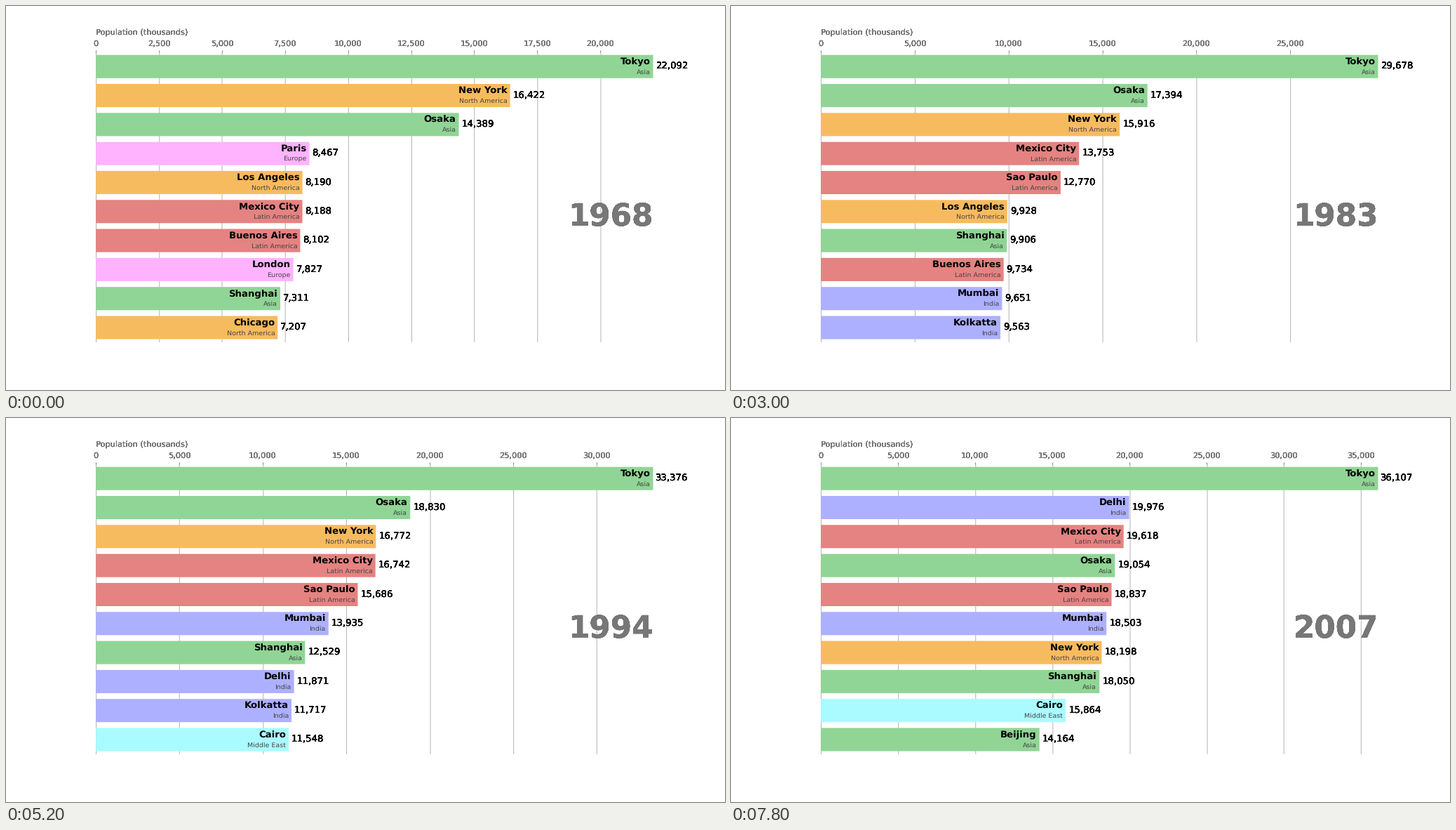
A matplotlib script that plays this animation: 1025x547 px, repeating every 8 s.

```python
import numpy as np
import matplotlib.pyplot as plt
from matplotlib.animation import FuncAnimation

W, H, DPI = 1025, 547, 64
PT = W / 15 / DPI            # one point of a 15 inch wide chart
LAYOUT_W = 1080              # chart width whose pixel grid the lines follow
PIXEL = 72 / DPI * W / LAYOUT_W
LEFT, BOTTOM, WIDTH, HEIGHT = 0.125, 0.125, 0.775, 0.755
GREY = "#777777"
FIRST_YEAR, YEARS, BARS = 1968, 40, 10

COLORS = {
    "Asia": "#90d595",
    "India": "#adb0ff",
    "Europe": "#ffb3ff",
    "Latin America": "#e48381",
    "Middle East": "#aafbff",
    "North America": "#f7bb5f",
}

KEY_YEARS = [1968, 1973, 1979, 1987, 1994, 2001, 2007]

# city, region, first key year, thousands at the key years from there on
CITIES = [
    ("Tokyo", "Asia", 1968, (22092, 25288, 28162, 31194, 33376, 34684, 36107)),
    ("New York", "North America", 1968,
     (16422, 17161, 15901, 15931, 16772, 17868, 18198)),
    ("Osaka", "Asia", 1968, (14389, 15888, 16882, 17905, 18830, 18680, 19054)),
    ("Mexico City", "Latin America", 1968,
     (8188, 10380, 12682, 14824, 16742, 18621, 19618)),
    ("Shanghai", "Asia", 1968, (7311, 7960, 8953, 10860, 12529, 14520, 18050)),
    ("Sao Paulo", "Latin America", 1973,
     (8816, 11594, 13947, 15686, 17269, 18837)),
    ("Los Angeles", "North America", 1968, (8190, 8840, 9395, 10462)),
    ("Buenos Aires", "Latin America", 1968, (8102, 8697, 9287, 10181)),
    ("Paris", "Europe", 1968, (8467, 9190, 8815)),
    ("London", "Europe", 1968, (7827, 7700)),
    ("Chicago", "North America", 1968, (7207, 7500)),
    ("Rio de Janeiro", "Latin America", 1973, (7780, 8660)),
    ("Kolkatta", "India", 1979, (8802, 10324, 11717, 13187, 13823)),
    ("Mumbai", "India", 1987, (11209, 13935, 16672, 18503)),
    ("Delhi", "India", 1994, (11871, 16320, 19976)),
    ("Cairo", "Middle East", 1994, (11548, 13936, 15864)),
    ("Beijing", "Asia", 2001, (10757, 14164)),
]


def population(year, start, values):
    """Straight growth between key years, carried on beyond both ends."""
    first = KEY_YEARS.index(start)
    years = KEY_YEARS[first:first + len(values)]
    i = int(np.clip(np.searchsorted(years, year) - 1, 0, len(values) - 2))
    part = (year - years[i]) / (years[i + 1] - years[i])
    return values[i] + part * (values[i + 1] - values[i])


def ranking(year):
    """The largest cities of a year, smallest first."""
    rows = [(population(year, start, values), name, region)
            for name, region, start, values in CITIES]
    return sorted(rows)[-BARS:]


def thicken(image, dpi):
    """Make soft text edges nearly solid."""
    image[..., 3] = np.minimum(4 * image[..., 3], 1)
    return image, 0, 0


def on_grid(value, top):
    """Move a value to the nearest pixel centre of the layout grid."""
    left, width = LEFT * LAYOUT_W, WIDTH * LAYOUT_W
    x = np.floor(left + value / top * width + 0.5) + 0.5
    return (x - left) / width * top


def label(x, y, text, size, thick=True, **style):
    item = ax.text(x, y, text, size=size * PT, **style)
    if thick:
        item.set_agg_filter(thicken)


def draw_axis(top):
    ticks = np.arange(0, top, 2500 if top <= 22500 else 5000)
    ax.set_xlim(0, top)
    ax.set_ylim(-0.498, BARS - 0.502)
    ax.set_yticks([])
    ax.xaxis.set_ticks_position("top")
    ax.tick_params(axis="x", colors=GREY, labelsize=12 * PT,
                   length=3.5 * PT, pad=3.5 * PT, width=PIXEL)
    ax.set_xticks(ticks, labels=[f"{t:,.0f}" for t in ticks])
    for tick_label in ax.get_xticklabels():
        tick_label.set_agg_filter(thicken)
    for tick in ticks:
        ax.axvline(on_grid(tick, top), color="#b0b0b0", linewidth=PIXEL,
                   snap=False, zorder=0.5)
    ax.set_frame_on(False)


def draw(frame):
    year = FIRST_YEAR + frame
    rows = ranking(year)
    top = rows[-1][0]
    gap = top / 200

    ax.clear()
    for i, (value, name, region) in enumerate(rows):
        ax.barh(i, value, height=0.8, color=COLORS[region], snap=False)
        label(value - gap, i, name, 14, thick=False, weight="bold",
              ha="right", va="bottom")
        label(value - gap, i - 0.25, region, 10, thick=False, color="#444444",
              ha="right", va="baseline")
        label(value + gap, i, f"{value:,.0f}", 14, ha="left", va="center")
    draw_axis(top)

    label(1, 0.4, str(year), 46, transform=ax.transAxes, color=GREY,
          ha="right", weight="bold")
    label(0, 1.06, "Population (thousands)", 12, transform=ax.transAxes,
          color=GREY)


plt.rcParams["font.family"] = "DejaVu Sans"
plt.rcParams["text.hinting"] = "none"
fig = plt.figure(figsize=(W / DPI, H / DPI), dpi=DPI, facecolor="white")
ax = fig.add_axes([LEFT, BOTTOM, WIDTH, HEIGHT])

anim = FuncAnimation(fig, draw, frames=YEARS, interval=200, repeat=True)
plt.show()
```
